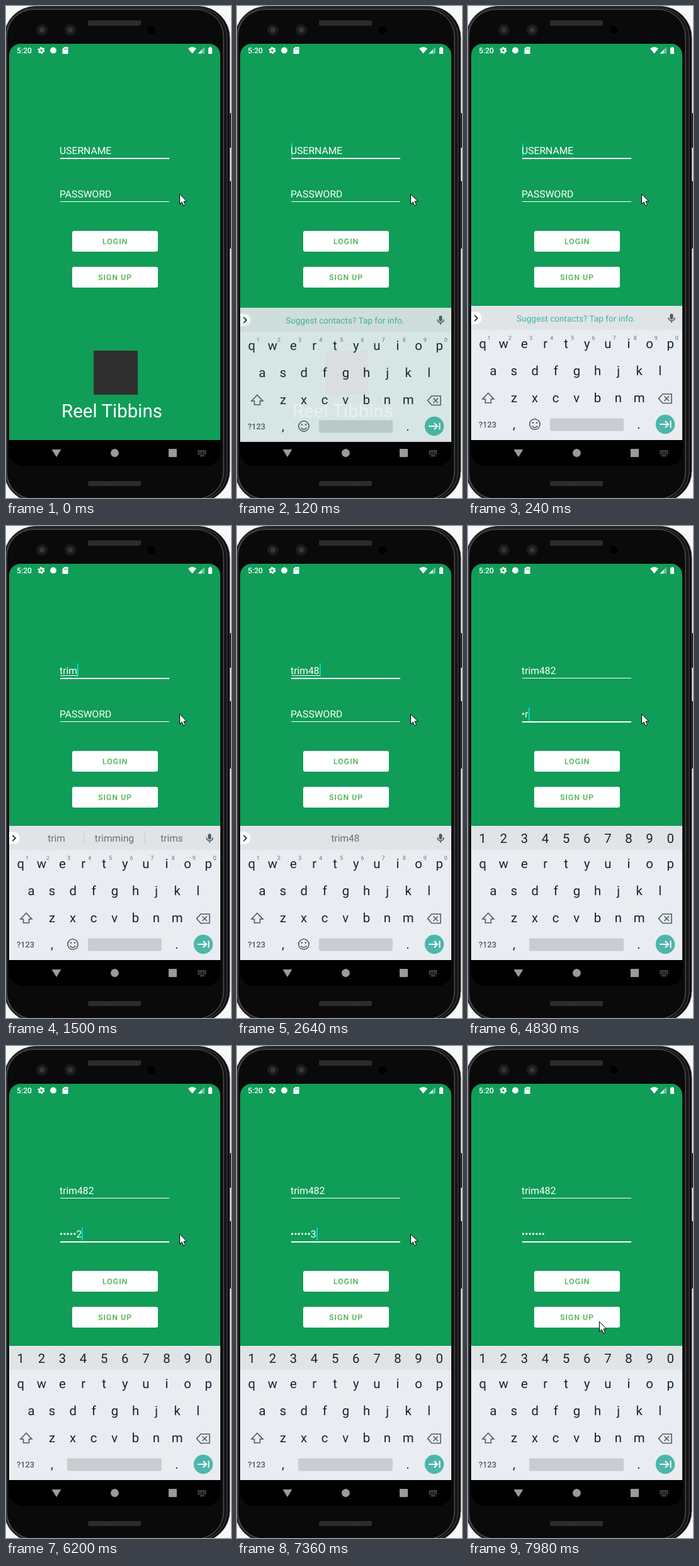
Write an HTML page that moves like this. It is 357x781 px and loops after 8 s.

```html
<!DOCTYPE html>
<html lang="en">
<head>
<meta charset="utf-8">
<title>Login screen</title>
<style>
html, body { margin: 0; width: 100%; height: 100%; overflow: hidden; background: #f8f8f8; }
svg { display: block; width: 100vw; height: 100vh; font-family: Roboto, sans-serif; text-rendering: geometricPrecision; }
.mid { text-anchor: middle; }
.field { font-size: 15.7px; fill: #fff; white-space: pre; }
.button { font-size: 12.2px; font-weight: 500; letter-spacing: 1.07px; fill: #4caf50; }
.key { font-size: 20.4px; fill: #15242e; }
.hint { font-size: 9px; fill: #69757d; }
.word { font-size: 15.5px; fill: #65717a; }
.line { fill: none; stroke: #4d5a63; stroke-width: 1.6; }
</style>
</head>
<body>
<svg viewBox="0 0 357 781" preserveAspectRatio="none">
  <defs>
    <pattern id="mesh" width="3" height="3" patternUnits="userSpaceOnUse">
      <rect width="3" height="3" fill="#0c0c0c"/>
      <path d="M0 0L3 3M3 0L0 3" stroke="#5a5a5a" stroke-width=".7"/>
    </pattern>
  </defs>

  <!-- phone body -->
  <path d="M354 170h3v55h-3zM354 278h3v107h-3z" fill="#161616"/>
  <rect x="-3" y=".5" width="358" height="787" rx="50" fill="#0a0a0a" stroke="#4a4a4a"/>
  <rect x="-1" y="3" width="352" height="782" rx="47" fill="#161616" stroke="#4c4c4c"/>
  <rect x="1" y="5.500" width="344" height="777" rx="43" fill="#0a0a0a" stroke="#666"/>
  <rect x="130" y="23" width="84" height="8" rx="2" fill="url(#mesh)"/>
  <rect x="130" y="754" width="84" height="8" rx="2" fill="url(#mesh)"/>
  <g fill="#1b1c20">
    <circle cx="57" cy="38" r="9"/><circle cx="102" cy="38" r="9"/>
    <circle cx="57" cy="38" r="4" fill="#34363d"/><circle cx="102" cy="38" r="4" fill="#34363d"/>
  </g>
  <circle cx="231" cy="38" r="6.5" fill="#000"/>

  <!-- screen -->
  <path d="M5 689V78a18 18 0 0 1 18-18H322a18 18 0 0 1 18 18V689z" fill="#0f9d58"/>
  <path d="M5 689H340V708a22 22 0 0 1-22 22H27a22 22 0 0 1-22-22z" fill="#000"/>
  <g fill="#fff">
    <text x="17" y="75" font-size="12.2" font-weight="500">5:20</text>
    <circle cx="56" cy="70.5" r="3.1" fill="none" stroke="#fff" stroke-width="2.6"/>
    <circle cx="56" cy="70.5" r="4.8" fill="none" stroke="#fff" stroke-width="1.6" stroke-dasharray="2.5 2.53"/>
    <circle cx="75" cy="70.5" r="5"/>
    <path d="M92.5 65H98.5V76H89.5V68zM92 67.5v2h1v-2zm2 0v2h1v-2zm2 0v2h1v-2z" fill-rule="evenodd"/>
    <path d="M289 67.5Q295.500 62.500 302 67.500L295.500 75.500z"/>
    <path d="M315 65V75.500H304.500z" opacity=".4"/><path d="M310.500 69.500V75.500H304.500z"/>
    <path d="M321 66.500h1.800V65h2.600v1.500H327V76h-6z"/>
  </g>
  <g fill="#9b9b9b">
    <path d="M72.500 704H87.500L80 716z"/><circle cx="172.500" cy="709.500" r="6.400"/>
    <rect x="258" y="703" width="13" height="13" rx="1"/>
    <path d="M304.500 708H317.500M304.500 711H317.500" stroke="#999" stroke-width="1.500" stroke-dasharray="1.500 1.300"/>
    <path d="M307.500 713.500h7v1h-7zM304.500 705.500h13v.8h-13z"/>
  </g>

  <!-- form -->
  <rect id="userLine" x="86" y="241" width="173" fill="#fff"/>
  <rect id="passLine" x="86" y="310" width="173" fill="#fff"/>
  <rect id="caret" width="2" height="21" fill="#03dac5"/>
  <text id="user" class="field" x="85" y="235"></text>
  <text id="pass" class="field" x="85" y="304"></text>
  <rect id="composing" x="86" y="237" height="1" fill="#fff"/>
  <g id="buttons"></g>
  <rect x="139" y="547" width="70" height="70" fill="#303030"/>
  <text class="mid" x="168" y="653" font-size="29.500" fill="#fff">Reel Tibbins</text>

  <!-- keyboard -->
  <g id="keyboard">
    <rect x="5" y="476" width="335" height="213" fill="#e9edf1"/>
    <rect x="5" y="476" width="335" height="38" fill="#e0e4e7"/>
    <g id="letters"></g>
    <path class="line" d="M32 614.500L23 624h4.500v6h9v-6H41z"/>
    <path class="line" d="M309 616H323V630.500H309L302.500 623.200zM311.500 619.500l7.500 7.500m0-7.500l-7.500 7.500"/>
    <text class="mid" x="31" y="669" font-size="12.800" font-weight="500" fill="#4d5a63">?123</text>
    <rect id="space" y="654.500" height="20" rx="2" fill="#c8cdd1"/>
    <circle cx="313" cy="664" r="15.200" fill="#4db6ac"/>
    <path d="M304 664H318M313 659l5 5-5 5M321.500 658.500v11" fill="none" stroke="#fff" stroke-width="2"/>
    <g id="plain">
      <g id="hints"></g>
      <circle class="line" cx="106" cy="664" r="8.200"/>
      <path class="line" d="M101.500 666.500q4.500 5.500 9 0"/>
      <circle cx="103" cy="661.500" r="1.300" fill="#4d5a63"/><circle cx="109" cy="661.500" r="1.300" fill="#4d5a63"/>
      <path d="M5 485.500h7a9.800 9.800 0 0 1 0 19.600H5z" fill="#fff"/>
      <path d="M10.500 491l4.500 4.500-4.500 4.500" fill="none" stroke="#26333b" stroke-width="1.800"/>
      <rect x="320.500" y="488.500" width="5" height="9" rx="2.500" fill="#4d5a63"/>
      <path class="line" d="M318 494.500a5.100 5.100 0 0 0 10.200 0M323 499.500v3.500"/>
      <text id="tip" class="mid" x="171.500" y="500.500" font-size="13.600" fill="#45b3a5">Suggest contacts? Tap for info.</text>
      <path id="dividers" d="M123.500 485v20M220.500 485v20" stroke="#c5cacf"/>
      <text class="word mid" x="80" y="501"></text>
      <text class="word mid" x="172" y="501"></text>
      <text class="word mid" x="263" y="501"></text>
    </g>
    <g id="numbers"></g>
  </g>
  <path id="pointer" d="M0 0V16L3.700 12.600L6.300 18.500L9 17.300L6.500 11.500H11.300z" fill="#fff" stroke="#000" stroke-width="1"/>
</svg>
<script>
const LOOP = 8000;
const $ = id => document.getElementById(id);
const words = document.querySelectorAll('.word');

function label(parent, cls, x, y, text) {
  const el = document.createElementNS('http://www.w3.org/2000/svg', 'text');
  el.setAttribute('class', cls + ' mid');
  el.setAttribute('x', x);
  el.setAttribute('y', y);
  el.textContent = text;
  parent.append(el);
}
function row(parent, cls, chars, x, y) {
  [...chars].forEach((c, i) => label(parent, cls, x + i * 33.1, y, c));
}
row($('letters'), 'key', 'qwertyuiop', 23.3, 543);
row($('letters'), 'key', 'asdfghjkl', 40, 585.5);
row($('letters'), 'key', 'zxcvbnm', 73, 628.5);
label($('letters'), 'key', 73, 671, ',');
label($('letters'), 'key', 271, 671, '.');
row($('hints'), 'hint', '1234567890', 33.5, 529.5);
row($('numbers'), 'key', '1234567890', 23.3, 503);

[['LOGIN', 357], ['SIGN UP', 414]].forEach(([text, y]) => {
  $('buttons').insertAdjacentHTML('beforeend',
    `<rect x="105" y="${y + .6}" width="136" height="33" rx="3" fill="#086b39" opacity=".25"/>
     <rect x="105" y="${y}" width="136" height="33" rx="3" fill="#fff"/>`);
  label($('buttons'), 'button', 173.2, y + 21.3, text);
});

const secret = 'trim123';
const typed = n => ({ pass: '•'.repeat(n - 1) + secret[n - 1], caret: 1 });

// Each step overrides only the values that change.
const steps = [
  [0, { user: '', pass: '', focus: 'user', caret: 0, board: 'none', tip: 1, words: [], composing: 0, at: [275.5, 298.5] }],
  [120, { board: 'rising', caret: 1 }],
  [240, { board: 'plain' }],
  [500, { caret: 0 }],
  [880, { user: 't', composing: 1, caret: 1 }],
  [1130, { user: 'tr' }],
  [1250, { user: 'tri' }],
  [1500, { user: 'trim', tip: 0, words: ['trim', 'trimming', 'trims'] }],
  [2000, { caret: 0 }],
  [2390, { user: 'trim4', words: ['', 'trim4', ''], caret: 1 }],
  [2640, { user: 'trim48', words: ['', 'trim48', ''] }],
  [2760, { user: 'trim482', words: [], composing: 0 }],
  [3310, { caret: 0 }],
  [3700, { focus: 'pass', caret: 1 }],
  [3820, { board: 'numbers' }],
  [4200, { caret: 0 }],
  [4580, typed(1)],
  [4830, typed(2)],
  [4950, typed(3)],
  [5200, typed(4)],
  [5700, { caret: 0 }],
  [5950, typed(5)],
  [6200, typed(6)],
  [6450, typed(7)],
  [6980, { caret: 0 }],
  [7360, { caret: 1 }],
  [7740, { at: [290, 312] }],
  [7860, { at: [262, 366], caret: 0 }],
  [7980, { at: [208.5, 437.5], pass: '•'.repeat(7) }]
];

const set = (el, values) => Object.entries(values).forEach(([k, v]) => el.setAttribute(k, v));
const show = (id, on) => set($(id), { visibility: on ? 'visible' : 'hidden' });

function draw(s) {
  $('user').textContent = s.user || 'USERNAME';
  $('pass').textContent = s.pass || 'PASSWORD';
  set($('userLine'), { height: s.focus === 'user' ? 2 : 1 });
  set($('passLine'), { height: s.focus === 'pass' ? 2 : 1 });
  const width = s[s.focus] ? $(s.focus).getComputedTextLength() : 0;
  set($('caret'), { x: Math.max(86, Math.round(85 + width)), y: s.focus === 'user' ? 218 : 288, opacity: s.caret });
  set($('composing'), { width, opacity: s.composing });

  const rising = s.board === 'rising', numeric = s.board === 'numbers';
  set($('keyboard'), {
    display: s.board === 'none' ? 'none' : 'inline',
    transform: `translate(0 ${rising ? 3 : 0})`,
    opacity: rising ? .92 : 1
  });
  set($('plain'), { display: numeric ? 'none' : 'inline' });
  set($('numbers'), { display: numeric ? 'inline' : 'none' });
  set($('space'), { x: numeric ? 97 : 130, width: numeric ? 150 : 117 });
  show('tip', s.tip);
  show('dividers', s.words[0]);
  words.forEach((el, i) => { el.textContent = s.words[i] || ''; });
  set($('pointer'), { transform: `translate(${s.at})` });
}

const start = performance.now();
let current = -1;
function tick() {
  const t = (performance.now() - start) % LOOP;
  const past = steps.filter(([at]) => at <= t);
  if (past.length !== current) {
    current = past.length;
    draw(Object.assign({}, ...past.map(([, change]) => change)));
  }
  requestAnimationFrame(tick);
}
tick();
</script>
</body>
</html>
```
